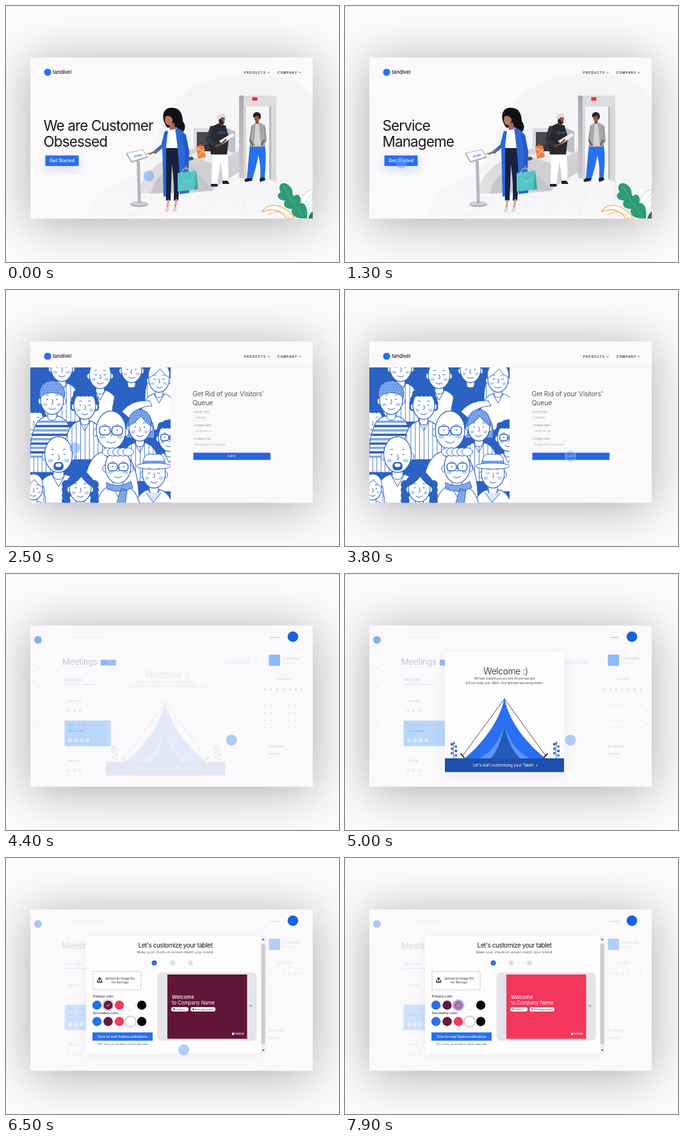
An HTML page with a canvas for the animation above (8 s loop, 520x400 px).

```html
<!DOCTYPE html>
<html lang="en">
<head>
<meta charset="utf-8">
<title>Visitor management walkthrough</title>
<style>
html, body { margin: 0; width: 100%; height: 100%; overflow: hidden; background: #fcfbfc; }
canvas { display: block; width: 520px; height: 400px; }
</style>
</head>
<body>
<canvas id="stage"></canvas>
<script>
const W = 520, H = 400, LOOP = 8000;
const BLUE = "#296ff1", INK = "#2b62c3", MID = "#7fa8ea", PALE = "#d9e7fc", PAGE = "#fbf9fb";
const MAROON = [97, 22, 56], PINK = [242, 54, 92];
const scale = window.devicePixelRatio || 1;
const stage = document.getElementById("stage");
stage.width = W * scale;
stage.height = H * scale;
const screen = stage.getContext("2d");
let g = screen;

// ---------- drawing helpers ----------
function shape(d, fill, line, width = 1) {
  const p = new Path2D(d);
  if (fill) { g.fillStyle = fill; g.fill(p); }
  if (line) { g.strokeStyle = line; g.lineWidth = width; g.stroke(p); }
}
function rect(x, y, w, h, fill, r = 0, line, width = 0.5) {
  g.beginPath();
  g.roundRect(x, y, w, h, r);
  if (fill) { g.fillStyle = fill; g.fill(); }
  if (line) { g.strokeStyle = line; g.lineWidth = width; g.stroke(); }
}
function oval(x, y, rx, ry, fill, line, width = 1) {
  g.beginPath();
  g.ellipse(x, y, rx, ry, 0, 0, 7);
  if (fill) { g.fillStyle = fill; g.fill(); }
  if (line) { g.strokeStyle = line; g.lineWidth = width; g.stroke(); }
}
const dot = (x, y, r, fill, line, width) => oval(x, y, r, r, fill, line, width);
function text(s, x, y, size, color, { weight = 400, track = 0, align = "left" } = {}) {
  g.font = `${weight} ${size}px Inter, Roboto, sans-serif`;
  g.letterSpacing = track + "px";
  g.textAlign = align;
  g.fillStyle = color;
  g.fillText(s, x, y);
}
function fade(x0, y0, x1, y1, a, b) {
  const f = g.createLinearGradient(x0, y0, x1, y1);
  f.addColorStop(0, a);
  f.addColorStop(1, b);
  return f;
}
function layer(draw) {
  const c = document.createElement("canvas");
  c.width = W * scale;
  c.height = H * scale;
  g = c.getContext("2d");
  g.scale(scale, scale);
  g.lineJoin = g.lineCap = "round";
  draw();
  g = screen;
  return c;
}
function show(c, alpha = 1, dy = 0) {
  if (alpha <= 0) return;
  g.globalAlpha = alpha;
  g.drawImage(c, 0, dy, W, H);
  g.globalAlpha = 1;
}
const clamp = v => Math.max(0, Math.min(1, v));
function ease(t, a, b) {
  const k = clamp((t - a) / (b - a));
  return k * k * (3 - 2 * k);
}

// ---------- page frame ----------
const backdrop = layer(() => {
  rect(0, 0, W, H, "#fcfbfc");
  rect(0, 0, W, 1, "#f3f2f3");
  g.shadowColor = "rgba(18,8,18,.33)";
  g.shadowBlur = 68 * scale;
  g.shadowOffsetY = 6 * scale;
  rect(38, 80.5, 441, 252, PAGE);
});

const header = layer(() => {
  dot(65, 103.5, 5.6, BLUE);
  text("tandivel", 73, 106, 8, "#25252c", { weight: 500, track: -0.15 });
  const nav = (s, x, cx) => {
    text(s, x, 105.6, 4.6, "#222", { weight: 600, track: 1.05 });
    shape(`M${cx - 1.6} 103.2l1.6 1.6l1.6-1.6`, null, "#333", 0.7);
  };
  nav("PRODUCTS", 372, 410);
  nav("COMPANY", 424, 459);
});

// ---------- landing ----------
function lobby() {
  shape("M130 332C134 286 172 278 200 262C236 242 232 188 262 150C290 116 350 106 390 106C440 107 468 124 480 145V332Z", fade(0, 240, 0, 332, "#f5f4f6", "#f8f8fb"));
  for (let i = 0; i < 5; i++) {
    shape(`M${190 + i * 58} 332L${262 + i * 40} 272`, null, "#e6e8ee", 0.7);
    shape(`M${165 + i * 12} ${328 - i * 14}L478 ${316 - i * 11}`, null, "#eaebf0", 0.6);
  }
  // desk and scanner
  shape("M207 293C214 254 245 238 294 222L369 224L366 244L322 289L292 292Z", fade(207, 290, 300, 230, "#e3e3e5", "#d2d2d5"));
  shape("M226 293C232 266 252 252 286 246L322 248V288Z", "#c6c6ca");
  shape("M280 242L322 249L368 238V257L322 286Z", "#d0d0d4");
  shape("M284 234L318 222L368 225L323 246Z", "#ededef");
  rect(293, 191, 56, 34, "#dcdce0", 1);
  rect(298, 197, 35, 30, "#494951");
  shape("M298 227L316 213H333V227Z", "#35353d");
  shape("M345 191L358 196V230L345 226Z", "#bfbfc6");
  shape("M297 219L309 218L312 236L300 239Z", "#f2813c");
  shape("M299 223l11 6m-9 4l9-9", null, "#fff", 0.9);
  shape("M301 219q3-6 6 0", null, "#d5632a", 1);
  shape("M283 237l7-2l4 4l-7 3Z", "#53535c");
  // gate
  shape("M364 140H422V276L411 270V157H375V271L364 268Z", "#d8d7da");
  shape("M364 140H371V270L364 268Z", fade(0, 140, 0, 270, "#a9a8ad", "#cbcace"));
  shape("M371 140H422V157H371Z", "#dddcdf");
  shape("M411 157H414V271L411 270Z", "#b9b8be");
  rect(384.5, 142.5, 8, 5.5, "#e8303c", 1);
}
function traveller() {
  shape("M381 217L404 217C407 234 405 251 404 268H397C398 252 396 241 394 233C392 247 388 259 385 270H376C378 252 379 234 381 217Z", "#2572ef");
  shape("M372 272l4-3h9l-1 4l-10 2Zm25-4h7l1 4l-8 3l-1-3Z", "#232329");
  shape("M383 187L390 182H396L405 187L407 211L402 220H382L380 208Z", "#a8a6aa");
  shape("M390 182H395L398 219H387Z", "#d4d3d6");
  shape("M384 188L381 209L388 217M404 190L405 211L399 213", null, "#918f94", 1.5);
  shape("M381 210l4 7m18-7l-4 7", null, "#8a5138", 2.3);
  rect(389.5, 177, 5, 7, "#7f4a33", 2);
  oval(391.8, 174.5, 4.4, 5.8, "#985b3f");
  shape("M386 174C384 163 399 163 398 174L396 178L394 171Z", "#24202a");
}
function guard() {
  shape("M322 229H346C347 244 348 258 347 273H339L335 243L330 278H321Z", "#fff", "#e2e1e5", 0.5);
  shape("M320 278h10l1 4h-11Zm18-5h8l3 5h-11Z", "#202027");
  shape("M322 188L333 183L343 187L348 205L345 232H320L316 208Z", "#28282f");
  shape("M321 190L315 209L330 220", null, "#34343c", 5.5);
  text("CREW", 330, 200, 4.6, "#2a6be0", { weight: 700 });
  shape("M333 211L354 198L358 202L338 216Z", "#f3f3f6", "#aaaab2", 0.5);
  shape("M328 219L337 215L343 209", null, "#7d4a35", 2.6);
  rect(334, 178, 5, 8, "#7d4a35", 2);
  oval(337, 177, 4.7, 6.3, "#8b543c");
  shape("M330 176C329 167 342 166 343 172L345 174H336L333 180Z", "#dbdbdf");
  shape("M332 178l1 5l5 2l4-3l-4-1l-3-5Z", "#272126");
}
function visitor() {
  shape("M252 190C241 176 244 158 259 159C273 159 276 171 276 180C282 187 280 196 273 199C270 197 268 194 267 190Z", "#111116");
  shape("M250 219H271C273 250 271 280 269 304H262C263 280 261 262 259 248L257 304H250C247 270 248 240 250 219Z", "#18223e");
  shape("M253.5 304L252 316M266 303L264 315", null, "#d79c82", 3);
  shape("M251 314l4 2l-1 5l-5 2l-1-3Zm12 0l4 1l-1 5l-5 2l-2-2Z", "#ead3c7");
  shape("M252 194L266 191L270 222H250Z", "#fff");
  shape("M255 184L262 182L265 192L256 194Z", "#a36a50");
  oval(254, 178, 6, 8.5, "#b57a5e");
  shape("M247 173C248 162 268 158 272 179L265 187C261 176 257 169 247 173Z", "#111116");
  shape("M264 191C276 192 282 198 284 220L286 292L271 294C272 262 269 224 264 191Z", "#2c67da");
  shape("M253 193L250 219L250 297L246 298L244 219Z", "#2c67da");
  shape("M250 198L245 218L233 228", null, "#2868d8", 5.5);
  shape("M237 225.5L225 231", null, "#a36a50", 3);
  shape("M226 230.5h-5", null, "#a36a50", 1.5);
  shape("M278 203L283 228L282 251", null, "#235bc8", 6.5);
  shape("M282 250l-1 6", null, "#a36a50", 3);
  shape("M268 261L297 257L300 286L268 290Z", "#56c5c5");
  shape("M297 257L300 286L294 287Z", "#3aa9ac");
  shape("M274 262q3-12 9-8q6 2 7 5", null, "#b4eeee", 1);
  shape("M277 271q6 8 14-1", null, "#8ae0dd", 1);
}
function kiosk() {
  oval(208, 310, 14, 4, "#aaaab0");
  oval(208, 308.5, 13, 3.5, "#cfced3");
  shape("M204 242H209L210.5 308H206Z", "#b6b5bc");
  shape("M187 231L214 224.5L222 237L196 245Z", "#b8b8be");
  shape("M188.5 230L213.5 224.5L220.5 235.5L196.5 243Z", "#fff", "#777780", 0.6);
  g.save();
  g.translate(200, 237);
  g.rotate(-0.25);
  text("SCAN", 0, 0, 4.4, BLUE, { weight: 700 });
  g.restore();
}
function plants() {
  shape("M400 322C410 304 436 310 450 332H438C430 318 414 315 400 322Z", "#fff", "#eda94c", 1.2);
  shape("M410 326Q428 315 444 332", null, "#eda94c", 0.8);
  shape("M470 332C452 309 463 289 479 287V332Z", "#fff", "#9fd2bf", 0.8);
  shape("M466 318L479 300M466 309L479 292M468 326L479 311", null, "#a9d8c6", 0.8);
  shape("M462 332C447 331 444 322 447 317C436 318 431 310 436 304C424 304 421 294 429 291C423 280 431 273 440 279C451 286 445 294 450 297C457 290 463 301 459 308C468 306 472 318 470 332Z", "#2f9b77");
  shape("M434 282C443 302 454 314 465 331", null, "#62bf9e", 0.8);
  shape("M472 332Q474 324 479 321V332Z", "#1f7d60");
}
const landing = layer(() => {
  g.save();
  g.beginPath();
  g.rect(38, 81, 441, 251.5);
  g.clip();
  [lobby, traveller, guard, kiosk, visitor, plants].forEach(f => f());
  g.restore();
  g.save();
  g.shadowColor = "rgba(41,111,241,.22)";
  g.shadowBlur = 16 * scale;
  g.shadowOffsetY = 5 * scale;
  rect(61.5, 233.5, 52, 16.5, BLUE, 1);
  g.restore();
  text("Get Started", 87.5, 244.4, 7.1, "#fff", { weight: 500, align: "center" });
});

function headline(t) {
  const first = t < 500;
  const lines = first ? ["We are Customer", "Obsessed"] : ["Service", "Management"];
  let n = first ? Math.ceil(24 * (1 - clamp((t - 60) / 420))) : Math.floor((t - 500) / 50);
  lines.forEach((s, i) => {
    text(s.slice(0, Math.max(0, n)), 58.5, 195.2 + i * 24.6, 22.4, "#17171c", { weight: 400, track: -0.82 });
    n -= s.length + 1;
  });
}

// ---------- sign-up form ----------
// Fills a shape and covers it with rows of short dashes.
function speckled(d, x, y, r, fill, mark) {
  shape(d, fill);
  g.save();
  g.clip(new Path2D(d));
  for (let j = -6; j < 7; j++)
    for (let i = -6; i < 7; i++) shape(`M${x + i * r / 4 + (j & 1) * 2} ${y + j * r / 4}l.8-1.6`, null, mark, 0.8);
  g.restore();
  shape(d, null, INK);
}
const dome = (x, y, r, w, drop) =>
  `M${x - r * w} ${y + r * drop}C${x - r * w * 1.25} ${y - r * 2.1} ${x + r * w * 1.25} ${y - r * 2.1} ${x + r * w} ${y + r * drop}`;
const hairBack = {
  curly(x, y, r) {
    for (let i = 0; i <= 12; i++) {
      const a = Math.PI * (0.95 + i * 0.0917);
      dot(x + Math.cos(a) * r, y + Math.sin(a) * r * 1.3, r * 0.34, INK);
    }
  },
  bob(x, y, r) { speckled(dome(x, y, r, 1.3, 1) + "Z", x, y, r, MID, INK); },
  wave(x, y, r) {
    speckled(dome(x, y, r, 1.4, 0.7) + "Z", x, y, r, INK, MID);
    for (let i = 0; i < 4; i++) for (const k of [-1, 1]) dot(x + k * r * 1.3, y - r * 0.3 + i * r * 0.5, r * 0.4, INK);
  },
  long(x, y, r) {
    shape(dome(x, y, r, 1.35, 2.6) + "Z", "#fff", INK);
    for (const k of [-1, 1]) shape(`M${x + k * r * 1.15} ${y - r * 0.3}V${y + r * 2.4}`, null, INK, 0.8);
  }
};
const fringe = (x, y, r) => dome(x, y, r, 1.02, -0.1) + `Q${x + r * 0.5} ${y - r * 0.4} ${x + r * 0.1} ${y - r}Q${x - r * 0.4} ${y - r * 0.4} ${x - r * 1.02} ${y - r * 0.1}Z`;
const hairFront = {
  curly(x, y, r) { for (let i = -2; i <= 2; i++) dot(x + i * r * 0.38, y - r * 1.08, r * 0.3, INK); },
  bob(x, y, r) { speckled(fringe(x, y, r), x, y, r, MID, INK); },
  wave(x, y, r) { shape(fringe(x, y, r), INK); },
  long(x, y, r) { shape(fringe(x, y, r), "#fff", INK); },
  cap(x, y, r) { speckled(dome(x, y, r, 1.08, -0.2) + `Q${x} ${y - r} ${x - r * 1.08} ${y - r * 0.2}Z`, x, y, r, MID, INK); },
  quiff(x, y, r) { for (let i = -2; i <= 2; i++) oval(x + i * r * 0.4, y - r * 1.15, r * 0.42, r * 0.32, "#fff", INK); },
  hat(x, y, r) {
    shape(`M${x - r * 0.95} ${y - r * 0.6}Q${x - r} ${y - r * 1.9} ${x} ${y - r * 1.6}Q${x + r} ${y - r * 1.9} ${x + r * 0.95} ${y - r * 0.6}Z`, "#fff", INK);
    rect(x - r * 0.95, y - r * 1.05, r * 1.9, r * 0.4, MID, 1, INK);
    oval(x, y - r * 0.6, r * 1.5, r * 0.27, "#fff", INK);
  }
};
function person(x, y, r, hair, { glasses, stripes, pleats, shut, beard, fill = "#fff", flip = 1 } = {}) {
  const by = y + r * 1.45;
  if (hairBack[hair]) hairBack[hair](x, y, r);
  const body = `M${x - r * 1.9} ${y + r * 5}Q${x - r * 1.9} ${by + r * 0.3} ${x - r * 0.5} ${by}H${x + r * 0.5}Q${x + r * 1.9} ${by + r * 0.3} ${x + r * 1.9} ${y + r * 5}Z`;
  shape(body, fill, INK, 1.1);
  g.save();
  g.clip(new Path2D(body));
  for (let i = 1; i < 10; i++) {
    if (stripes) rect(x - r * 2, by + i * r * 0.38, r * 4, r * 0.2, i % 2 ? MID : INK);
    if (pleats) rect(x - r * 2 + i * r * 0.4, by, 0.8, r * 4, INK);
  }
  g.restore();
  rect(x - r * 0.38, y + r * 0.7, r * 0.76, r * 1.1, "#fff", r * 0.3, INK, 1);
  if (!stripes) shape(`M${x - r * 0.5} ${by}L${x} ${by + r * 0.9}L${x + r * 0.5} ${by}`, null, INK);
  for (const k of [-1, 1]) oval(x + k * r, y + r * 0.15, r * 0.2, r * 0.27, "#fff", INK);
  oval(x, y, r, r * 1.3, "#fff", INK, 1.2);
  if (hairFront[hair]) hairFront[hair](x, y, r);
  for (const k of [-1, 1]) {
    const ex = x + k * r * 0.42, ey = y;
    if (shut) shape(`M${ex - 2} ${ey}q2 2 4 0`, null, INK, 1);
    else dot(ex, ey, 1, INK);
    shape(`M${ex - 2} ${ey - r * 0.36}q2-1.5 4 0`, null, INK, 0.9);
    oval(x + k * r * 0.6, y + r * 0.45, r * 0.2, r * 0.14, "#bcd3f8");
    if (glasses) rect(ex - r * 0.36, ey - r * 0.27, r * 0.72, r * 0.6, null, r * 0.22, INK, 1.5);
  }
  shape(`M${x} ${y}q${3 * flip} ${r * 0.45} ${-flip} ${r * 0.4}`, null, INK, 1);
  if (beard) {
    rect(x - r * 0.36, y + r * 0.55, r * 0.72, r * 0.6, INK, r * 0.25);
    oval(x, y + r * 0.78, r * 0.22, r * 0.14, "#fff");
  } else shape(`M${x - r * 0.3} ${y + r * 0.76}q${r * 0.3} ${r * 0.25} ${r * 0.6} 0`, null, INK, 1);
}
const form = layer(() => {
  rect(38, 120.3, 441, 0.7, "#ecebee");
  g.save();
  g.beginPath();
  g.rect(38, 121, 219, 211.5);
  g.clip();
  rect(38, 121, 219, 212, INK);
  person(87, 121, 17, "bald", { pleats: true });
  person(147, 132, 17, "quiff", { shut: true });
  person(196, 124, 16, "bald", { flip: -1, fill: INK });
  person(239, 139, 16, "long", { shut: true });
  person(43, 205, 16, "curly", { pleats: true });
  person(72, 171, 18, "cap", { stripes: true });
  person(123, 180, 17, "curly", { pleats: true });
  shape("M181 190Q196 171 224 173L228 181Q204 181 194 201Z", "#fff", INK);
  person(209, 214, 17, "bob", { pleats: true });
  person(255, 230, 17, "curly", { glasses: true });
  person(164, 219, 23, "bald", { glasses: true });
  person(82, 257, 21.5, "bald", { beard: true });
  person(43, 310, 14, "long", { stripes: true });
  person(231, 286, 18, "hat", { shut: true });
  shape("M219 317l11 15l12-15", PALE, INK);
  person(175, 276, 20, "quiff", { glasses: true });
  shape("M157 301Q176 311 195 299L198 309Q177 319 158 311ZM180 310l9 3l-3 21h-13Z", MID, INK);
  person(116, 309, 17, "wave");
  g.restore();

  const light = { weight: 300, track: -0.1 };
  text("Get Rid of your Visitors’", 291.5, 165.8, 10.4, "#2b2b33", light);
  text("Queue", 291.5, 179.8, 10.4, "#2b2b33", light);
  [["Account Type", "Company"], ["Company Name", "Lumibrook Ltd"], ["Company Email", "hello@lumibrook.example"]].forEach(([label, value], i) => {
    const y = 191.5 + i * 21;
    text(label, 292.5, y, 3.7, "#8f8f97");
    rect(292.5, y + 3, 120, 10, "#fcfbfc", 0, "#f0f0f2");
    text(value, 294.5, y + 9.6, 4, "#b0b0b7");
  });
  rect(292.5, 254.3, 120.5, 11.2, "#2565e2");
  text("Submit", 352.5, 261.3, 4.2, "#cfe0ff", { align: "center" });
});

// ---------- dashboard ----------
const dashboard = layer(() => {
  const bar = (x, y, w, c = "#e8e8ee") => rect(x, y, w, 1.6, c, 0.5);
  dot(50, 103, 6, "#82aff3");
  rect(65, 118, 0.7, 214, "#f0f0f4");
  rect(65, 118.5, 414, 0.6, "#f1f1f4");
  for (let i = 0; i < 4; i++) rect(49, 146 + i * 28, 4, 3, "#eceff7", 1);
  bar(100, 98, 55, "#f0f0f4");
  bar(413, 98.5, 14, "#b9d3fa");
  text("Meetings", 88, 142, 13, "#c5c5ce", { track: -0.3 });
  rect(148, 134, 24, 9, "#8bb9f9", 1);
  text("All for Today", 92, 167, 4.4, "#bcd4f8", { weight: 600 });
  rect(92, 172, 46, 1, "#b3d2fb");
  rect(84, 172.7, 306, 150, null, 0, "#f2f2f5");
  for (const [y, label] of [[200, "Team sync"], [293, "Standup"]]) {
    text(label, 96, y, 4.3, "#d9d9e0", { weight: 600 });
    for (let i = 0; i < 3; i++) dot(98 + i * 9, y + 14, 2, "#e7ecf5");
  }
  rect(91.5, 229, 72, 40, "#bad6fb");
  text("10:00 - 10:30", 97, 238, 4.2, "#8cb9f7");
  text("Sales review", 97, 247, 4.3, "#8cb9f7", { weight: 600 });
  for (let i = 0; i < 4; i++) dot(100 + i * 9, 260, 3, "#dceafd");
  rect(342, 133, 39, 8, "#f0f4fb");
  rect(410.5, 126, 17.5, 17.5, "#8bb9f9", 1);
  text("Calendar", 432, 133.5, 6.5, "#cfcfd7");
  bar(432, 138, 20);
  text("June 2019", 434, 166, 4.5, "#d5d5dd", { align: "center", weight: 600 });
  for (let row = 0; row < 6; row++)
    for (let col = 0; col < 7; col++)
      if (row !== 1 || col > 4) text(row ? "•" : "x", 403 + col * 9.6, 182 + row * 12, 4.5, "#c6c6d2", { weight: 700 });
  text("No reminders", 410, 271, 4.2, "#d5d5dd", { weight: 600 });
  bar(410, 280, 19, "#c9dffb");
});
const avatar = layer(() => dot(448, 98, 8.3, "#1764dc"));

function panel(x, y, w, h) {
  g.save();
  g.shadowColor = "rgba(60,70,100,.07)";
  g.shadowBlur = 18 * scale;
  g.shadowOffsetY = 4 * scale;
  rect(x, y, w, h, "#fefdfe");
  g.restore();
}
const welcome = layer(() => {
  const mid = { align: "center" };
  panel(156, 121.5, 186, 188);
  text("Welcome :)", 251, 156.5, 13.8, "#18181d", { ...mid, weight: 300, track: -0.3 });
  text("We have created your account. All you have got", 249, 165, 4.2, "#3a3a42", mid);
  text("left is to setup your Tablet / Oryl and start welcoming visitors", 249, 172, 4.2, "#3a3a42", mid);
  shape("M249 195L183 285M249 195L314 285", null, "#33333b", 0.9);
  shape("M181 281l5 6m130-6l-6 6", null, "#222", 1.8);
  shape("M249 193C243 226 218 262 187 288H313C280 262 254 226 249 193Z", BLUE);
  shape("M249 238C240 261 231 277 210 288H288C267 277 258 261 249 238Z", "#5d95f8");
  shape("M249 238C244 260 239 274 228 288H273C260 274 254 260 249 238Z", "#2459bd");
  for (const x of [170, 330]) {
    shape(`M${x} 288q-2-12 0-23`, null, "#23488f", 0.9);
    for (let i = 0; i < 6; i++) dot(x + (i % 2 ? 3.2 : -3.2), 266 + i * 3.5, 1.9, i % 3 ? "#3d72cf" : "#234b98");
    dot(x, 264, 1.7, "#3d72cf");
  }
  rect(156, 288, 186, 21.5, "#1f50ae");
  text("Let's start customizing your Tablet  +", 250.5, 301, 5.8, "#fff", mid);
});

const SWATCHES = [BLUE, "#6a173d", "#f13a60", "#fff", "#050506"];
const swatchX = i => 142 + i * 17.5;
function selected(i, y) {
  dot(swatchX(i), y, 8.7, null, "#b9b9c1", 1.1);
}
const editor = layer(() => {
  const mid = { align: "center" };
  panel(125, 121.5, 273, 183.5);
  rect(398, 121.5, 7.5, 183.5, "#f0f0f1");
  rect(398.7, 134, 6, 157, "#cdcdd0");
  shape("M399.8 128.5l2-3l2 3ZM399.8 299l2 3l2-3Z", "#55555b");
  text("Let's customize your tablet", 264.5, 140, 10, "#18181d", { ...mid, track: -0.43 });
  text("Make your check-in screen match your brand", 264, 149, 5.2, "#55555c", { ...mid, track: 0.18 });
  rect(235, 163.7, 50, 0.6, "#e3e3e8");
  [231.5, 260, 288].forEach((x, i) => {
    dot(x, 164, 4, i ? "#e2e2e8" : "#2468df");
    text(i + 1, x, 165.5, 4, i ? "#b2b2bb" : "#fff", mid);
  });
  g.setLineDash([2.5, 2]);
  rect(136, 177, 75, 29, null, 0, "#a8a8af", 0.7);
  g.setLineDash([]);
  shape("M143 191v3h6.5v-3M146.2 192v-4.5M144.2 189l2-2l2 2", null, "#222", 1.3);
  text("Upload an image file", 178, 190, 4.8, "#333", mid);
  text("for the logo", 178, 196, 4.8, "#333", mid);
  ["Primary color", "Secondary color"].forEach((s, row) => {
    text(s, 135.5, 217.5 + row * 26.3, 5.1, "#333", { weight: 500 });
    SWATCHES.forEach((c, i) => dot(swatchX(i), 230 + row * 25.5, 7.2, c, c === "#fff" ? "#e3e3e8" : null, 0.7));
  });
  selected(3, 255.5);
  rect(135, 272.5, 94, 13, "#286ff0");
  text("Done for now! Explore notifications", 182, 280.8, 4.75, "#fff", { ...mid, weight: 500, track: -0.08 });
  text("Don't worry, you are able to edit this again later", 182, 291.8, 3.55, "#55555c", mid);
  rect(237, 179.5, 154, 105.5, "#e5e5e9", 6, "#d0d0d6");
  dot(244, 232, 1, "#d1d1d6");
  dot(382.5, 231, 2.6, "#f3f3f5", "#c5c5ca", 0.5);
  rect(381.8, 230, 1.5, 2, "#333");
});
function tablet(t) {
  const k = ease(t, 7330, 7550);
  const ink = `rgb(${MAROON.map((v, i) => Math.round(v + (PINK[i] - v) * k))})`;
  rect(252, 182, 124.5, 100.5, ink);
  text("Welcome", 259, 219.5, 7.7, "#fff", { weight: 500, track: 0.1 });
  text("to Company Name", 259, 229, 7.7, "#fff", { track: -0.05 });
  const pill = (x, w, s) => {
    rect(x, 233, w, 6.7, "#fff", 3.3);
    dot(x + 4.5, 236.3, 1.3, ink);
    text(s, x + 7.2, 237.5, 3.4, "#333");
  };
  pill(258, 27, "Check in");
  pill(288, 39, "Book appointment");
  rect(353, 273, 3, 3.5, "#fff");
  text("tandivel", 357, 276.2, 4, "#fff", { weight: 500 });
  const pick = t < 7330 ? 1 : 2;
  selected(pick, 230);
  const x = swatchX(pick);
  shape(`M${x - 2.2} 230l1.6 1.8l3-3.6`, null, "#fff", 1);
}

// ---------- pointer ----------
const STOPS = [
  [0, 1000, 88, 245.5],
  [2300, 3500, 352, 259.5],
  [5020, 5450, 277.5, 299.5],
  [6550, 7200, 177, 230]
];
const CLICKS = [1500, 3800, 5520, 7330];
function pointer(t) {
  let x = 223, y = 265.5;
  for (const [a, b, tx, ty] of STOPS) {
    const k = ease(t, a, b);
    x += (tx - x) * k;
    y += (ty - y) * k;
  }
  const press = Math.max(...CLICKS.map(c => clamp(1 - Math.abs(t - c) / 260)));
  const strong = t > 1400 && t < 2300 ? 0.25 : 0;
  dot(x, y, 8.6 - press * 1.2, `rgba(98,160,247,${0.5 + strong - press * 0.12})`);
  if (press > 0) dot(x, y, 8.2, null, `rgba(175,205,255,${press * 0.7})`, 1.2);
}

function render(t) {
  g.setTransform(scale, 0, 0, scale, 0, 0);
  g.lineJoin = g.lineCap = "round";
  show(backdrop);
  const toDash = ease(t, 3880, 4350), toEdit = ease(t, 5680, 6050);
  show(header, 1 - toDash);
  const land = 1 - ease(t, 1430, 1630);
  show(landing, land);
  if (land > 0) {
    g.globalAlpha = land;
    headline(t);
    g.globalAlpha = 1;
  }
  show(form, ease(t, 1530, 2050) * (1 - toDash));
  show(dashboard, toDash * (1 - 0.35 * toEdit));
  show(avatar, toDash);
  const hello = ease(t, 4300, 4800);
  show(welcome, hello * (1 - ease(t, 5540, 5760)), (1 - hello) * 6);
  show(editor, toEdit);
  if (toEdit > 0) {
    g.globalAlpha = toEdit;
    tablet(t);
    g.globalAlpha = 1;
  }
  pointer(t);
}

const start = performance.now();
function tick() {
  render((performance.now() - start) % LOOP);
  requestAnimationFrame(tick);
}
tick();
</script>
</body>
</html>
```
